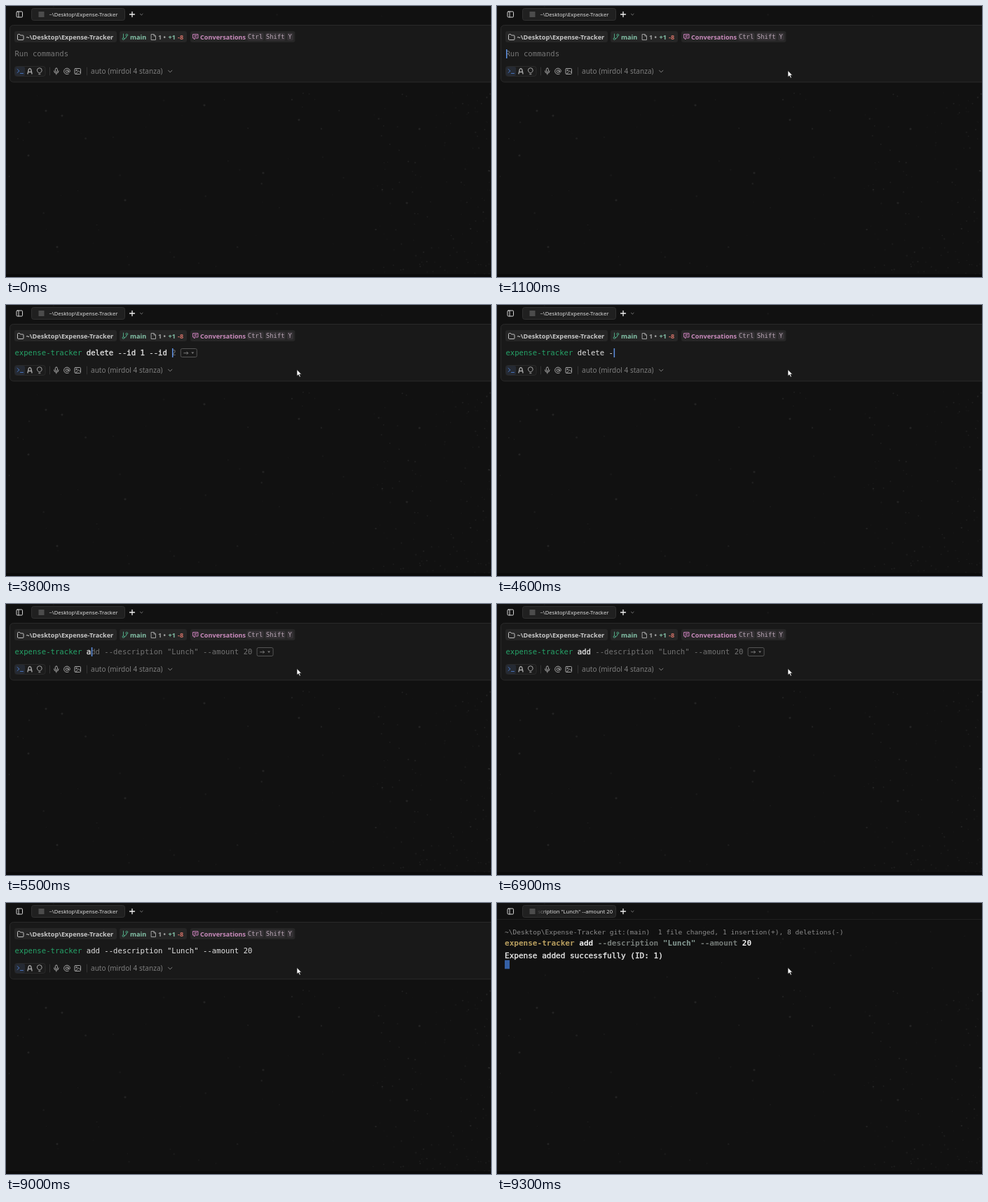
An HTML page that plays this animation: 692x388 px, repeating every 9.4 s.

```html
<!DOCTYPE html>
<html lang="en">
<head>
<meta charset="utf-8">
<title>Terminal demo</title>
<style>
html, body { margin: 0; width: 100%; height: 100%; overflow: hidden; background: #111; }
svg { display: block; width: 100vw; height: 100vh; }
text { white-space: pre; font-family: "Noto Sans", "Open Sans", sans-serif; }
.mono text, text.mono { font-family: "DejaVu Sans Mono", monospace; }
.cmd { font-size: 10.63px; }
.out { font-size: 11.04px; }
.b { font-weight: 700; }
.strong { stroke: currentColor; stroke-width: .35px; }
.chip text { font-size: 9.15px; font-weight: 600; }
.chip text.key { font-size: 8.8px; font-weight: 400; }
.line { fill: none; stroke-width: 1; stroke-linecap: round; stroke-linejoin: round; }
</style>
</head>
<body>
<svg viewBox="0 0 692 388">
  <defs>
    <linearGradient id="fade">
      <stop offset="0" stop-color="#222"/>
      <stop offset="1" stop-color="#222" stop-opacity="0"/>
    </linearGradient>
    <clipPath id="tabClip"><rect x="57" y="4" width="109" height="16"/></clipPath>
  </defs>
  <rect width="692" height="388" fill="#111"/>
  <g id="specks" fill="#fff"></g>
  <rect y="384" width="692" height="4" fill="#0b0b0b"/>

  <g id="bar">
    <g class="line" stroke="#d4d4d4">
      <rect x="15" y="8" width="8.5" height="8" rx="1.2"/>
      <path d="M18 8v8"/>
      <path d="M176.5 12h7M180 8.500v7" stroke="#f0f0f0" stroke-width="1.300"/>
      <path d="M191.500 11.300l1.800 1.700 1.800-1.700" stroke="#777"/>
    </g>
    <rect x="36.500" y="3.500" width="133" height="17" rx="3" fill="#202020" stroke="#303030"/>
    <rect x="46.500" y="8" width="8" height="8" fill="#4c4c4c"/>
    <g clip-path="url(#tabClip)">
      <text id="tab" y="14.700" font-size="7.620" fill="#dedede"></text>
      <rect id="tabFade" x="57" y="5" width="14" height="14" fill="url(#fade)"/>
    </g>
  </g>

  <g id="panel">
    <rect x="5.500" y="27.500" width="700" height="81.500" rx="5" fill="#191919" stroke="#2a2a2a"/>
    <g class="chip">
      <g fill="#262626">
        <rect x="12" y="36" width="146" height="16" rx="3"/>
        <rect x="162" y="36" width="96" height="16" rx="3"/>
        <rect x="263" y="36" width="149.500" height="16" rx="3"/>
      </g>
      <path class="line" stroke="#c0c0c0" d="M16.500 47.500v-6q0-1 1-1h2l1.200 1.500h3.300q1 0 1 1v4.500q0 1-1 1h-6.500q-1 0-1-1z"/>
      <text x="28.500" y="47.600" fill="#c6c6c6">~\Desktop\Expense-Tracker</text>
      <g class="line" stroke="#4fa582">
        <circle cx="167.500" cy="47" r="1.400"/><circle cx="172.300" cy="41.600" r="1.400"/>
        <path d="M167.500 40v5.500M172.300 43q0 3.500-3.400 3.800"/>
      </g>
      <text x="177" y="47.600" fill="#84c2a8">main</text>
      <path class="line" stroke="#a0a0a0" d="M207.500 40.500h3.500l2.500 2.500v5.500h-6zM211 40.500v2.500h2.500"/>
      <text x="217" y="47.600" fill="#a0a0a0">1 •</text>
      <text x="231.500" y="47.600" fill="#84c2a8">+1</text>
      <text x="245" y="47.600" fill="#cf7066">-8</text>
      <g class="line" stroke="#c87fb9">
        <path d="M267 40.500h7v5.500h-3.500l-2 2v-2h-1.500z"/><path d="M269 42.500h3.200M269 44.300h2"/>
      </g>
      <text x="277" y="47.600" fill="#c98bbc">Conversations</text>
      <g fill="#343134">
        <rect x="344" y="38.500" width="23.500" height="11" rx="2"/>
        <rect x="370" y="38.500" width="28.500" height="11" rx="2"/>
        <rect x="401" y="38.500" width="9" height="11" rx="2"/>
      </g>
      <g class="mono" fill="#b9a7b6">
        <text class="key" x="345" y="47">Ctrl</text>
        <text class="key" x="371" y="47">Shift</text>
        <text class="key" x="402.500" y="47">Y</text>
      </g>
    </g>

    <g class="mono cmd">
      <text id="input" x="12.400" y="72.400"></text>
      <path id="wave" class="line" stroke="#c8483f"/>
      <g id="accept">
        <rect x="6.500" y="62.500" width="23" height="12" rx="2" fill="none" stroke="#545454"/>
        <path class="line" stroke="#7c7c7c" d="M11 68.800h6m-1.800-1.600l1.800 1.600-1.800 1.600"/>
        <path fill="#7c7c7c" d="M21.500 67.500h4l-2 2.500z"/>
      </g>
      <rect id="caret" y="62" width="1.500" height="13" fill="#5d8fe0"/>
    </g>

    <rect x="12.500" y="86.500" width="43.500" height="14" rx="3" fill="#1c1c1c" stroke="#2a2a2a"/>
    <rect x="13" y="87" width="14" height="13" rx="2" fill="#252a33"/>
    <g class="line" stroke="#a6a6a6">
      <path stroke="#4670b8" d="M16 90.500l3 2.500-3 2.500M20.500 96.500h4"/>
      <path stroke-width="1.400" d="M31 97l1.300-6.200q1.700-2.600 3.400 0l1.300 6.200M32.500 94.500h3"/>
      <path d="M46.400 95.500q-2-1.700-2-3.400a3.400 3.400 0 0 1 6.800 0q0 1.700-2 3.400zM46.700 97.700h2.200"/>
      <rect x="70.300" y="89" width="3" height="5.600" rx="1.500"/>
      <path d="M68.500 93q0 3.300 3.300 3.300t3.300-3.300M71.800 96.300v1.700"/>
      <circle cx="87" cy="93.500" r="1.800"/>
      <path d="M88.800 91.700v2.200q.4 1.500 1.700.9 .8-.7.800-1.600a4.300 4.300 0 1 0-2 3.900"/>
      <rect x="98" y="89.500" width="8.500" height="8" rx="1"/>
      <circle cx="100.500" cy="92" r=".7"/><path d="M99.500 97l4-4 3 2.700"/>
      <path stroke="#343434" d="M62.500 88v11M115.500 88v11"/>
      <path stroke="#808080" d="M231.500 92.300l2.700 2.500 2.700-2.500"/>
    </g>
    <text x="121" y="97.300" font-size="10.050" fill="#7e7e7e">auto (mirdol 4 stanza)</text>
  </g>

  <g id="block" class="mono out">
    <path d="M0 23.500h692" stroke="#202020"/>
    <text x="11" y="45.200" font-size="9.570" fill="#8b8b8b">~\Desktop\Expense-Tracker git:(main)  1 file changed, 1 insertion(+), 8 deletions(-)</text>
    <text class="b" x="11" y="61.200" fill="#f2f2f2"><tspan fill="#b99f5f">expense-tracker</tspan> add <tspan fill="#757b78">--description</tspan> <tspan fill="#869b94">"Lunch"</tspan> <tspan fill="#757b78">--amount</tspan> 20</text>
    <text id="result" class="strong" x="11" y="79.300" fill="#ececec" color="#ececec">Expense added successfully (ID: 1)</text>
    <rect id="cursor" x="11" width="7" height="12.500" fill="#3560a5"/>
  </g>

  <path id="mouse" d="M0 0v9.300l2.200-1.900 1.600 3.400 1.600-.8-1.600-3.200h2.900z" fill="#fff" stroke="#111" stroke-width=".7"/>
</svg>
<script>
const LOOP = 9400, CELL = 6.4, LEFT = 12.4;
const TOOL = 'expense-tracker';
const DEL = TOOL + ' delete --id 1 --id 2';
const ADD = TOOL + ' add --description "Lunch" --amount 20';
const $ = id => document.getElementById(id);

// [time, line, typed length, suggestion shown]
const steps = [[0, '', 0, 0]];
const key = (line, hint, ...pairs) =>
  pairs.forEach(([t, n]) => steps.push([t, line, n, hint]));
key('', 0, [100, 0]);
key(DEL, 1, [1600, 1], [1800, 2], [1900, 3], [2100, 4], [2300, 5], [2400, 6], [2600, 7]);
key(DEL, 0, [3300, 36]);
key(DEL, 1, [3800, 35]);
key(DEL, 0, [4200, 34]);
for (let i = 0; i < 6; i++) key(DEL, 0, [4300 + i * 100, 33 - i * 3]);
key(DEL, 0, [5000, 17], [5300, 16]);
key(ADD, 1, [5500, 17], [5700, 18], [5800, 19], [6000, 19], [6400, 20],
  [7000, 21], [7200, 22], [7300, 23]);
key(ADD, 0, [8200, 53], [8300, 53]);

const show = (id, on) => $(id).setAttribute('visibility', on ? 'inherit' : 'hidden');
const span = (s, fill, strong) =>
  s && `<tspan fill="${fill}" color="${fill}"${strong ? ' class="strong"' : ''}>${s}</tspan>`;

function drawSpecks() {
  let seed = 29;
  const rnd = () => (seed = seed * 16807 % 2147483647) / 2147483647;
  let out = '';
  const dot = (x, y, r, a) =>
    out += `<circle cx="${x.toFixed(1)}" cy="${y.toFixed(1)}" r="${r.toFixed(2)}" opacity="${a.toFixed(3)}"/>`;
  for (let i = 0; i < 100; i++) dot(rnd() * 692, rnd() * 384, .5 + rnd() * .9, .02 + rnd() * .05);
  for (let i = 0; i < 150; i++)
    dot(692 - 170 * rnd() ** 1.3, 384 - 260 * rnd() ** 1.3, .5 + rnd() * .8, .02 + rnd() * .06);
  for (const [x, y] of [[57, 150], [80, 157], [32, 214], [367, 239], [418, 163],
    [590, 176], [170, 278], [572, 282], [283, 142], [73, 345]]) dot(x, y, 1.6, .08);
  $('specks').innerHTML = out;
}

function drawInput(t) {
  const [at, line, n, hint] = steps.findLast(s => s[0] <= t);
  const typed = line.slice(0, n), known = n >= TOOL.length;
  $('input').innerHTML = line
    ? span(known ? TOOL : '', '#25a368') +
      span(known ? typed.slice(TOOL.length) : typed, '#e2e2e2', hint) +
      span(hint ? line.slice(n) : '', '#727272')
    : span('Run commands', '#777');
  let wave = '';
  if (n && !known) {
    wave = `M${LEFT} 75`;
    for (let i = 0; i < n * CELL / 2 - 1; i++) wave += `l2 ${i % 2 ? 1.2 : -1.2}`;
  }
  $('wave').setAttribute('d', wave);
  show('accept', hint);
  $('accept').setAttribute('transform', `translate(${LEFT + line.length * CELL})`);
  show('caret', t >= 100 && (t - at) % 1000 < 500);
  $('caret').setAttribute('x', LEFT + n * CELL + .6);
}

function drawTab(ran) {
  const tab = $('tab');
  tab.textContent = ran ? ADD : '~\\Desktop\\Expense-Tracker';
  tab.setAttribute('x', ran ? 165 : 61.5);
  tab.setAttribute('text-anchor', ran ? 'end' : 'start');
  show('tabFade', ran);
}

function drawMouse(t) {
  const p = Math.min(1, Math.max(0, (t - 300) / 800)), left = (1 - p) ** 2;
  show('mouse', t >= 300);
  $('mouse').setAttribute('transform', `translate(${415 + 48 * left} ${92.4 + 191 * left})`);
}

function render(time) {
  const t = Math.floor(time % LOOP / 100) * 100;
  const ran = t >= 9100, done = t >= 9300;
  show('panel', !ran);
  show('block', ran);
  $('result').textContent = done ? 'Expense added successfully (ID: 1)' : '';
  $('cursor').setAttribute('y', done ? 81.8 : 66.5);
  drawInput(t);
  if (ran) ['caret', 'accept'].forEach(id => show(id, false));
  drawTab(t >= 9200);
  drawMouse(t);
}

drawSpecks();
const start = performance.now();
function frame() {
  render(performance.now() - start);
  requestAnimationFrame(frame);
}
frame();
</script>
</body>
</html>
```
